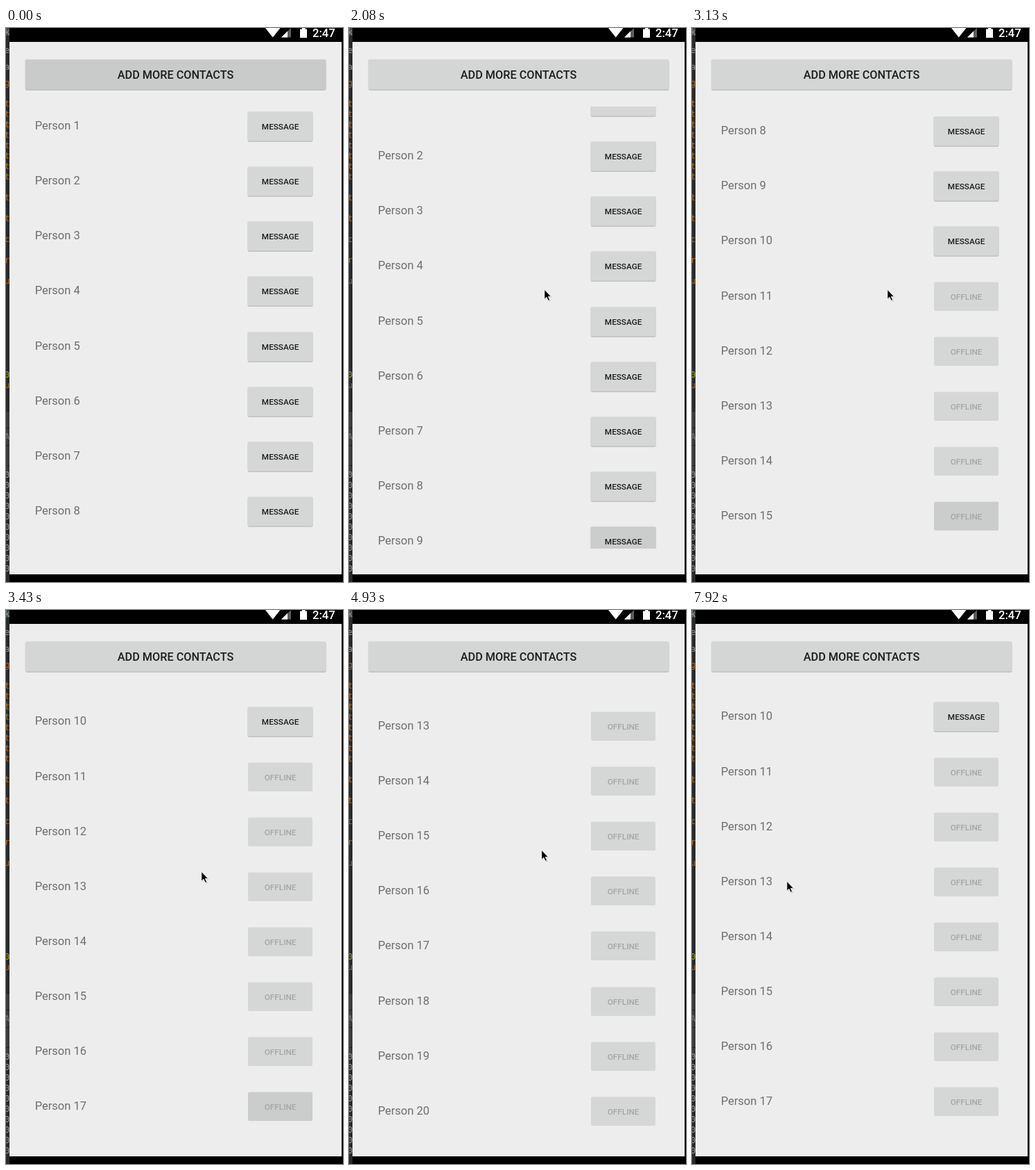
An HTML page that plays this animation: 486x797 px, repeating every 8 s.

```html
<!DOCTYPE html>
<html lang="en">
<head>
<meta charset="utf-8">
<title>Contact list</title>
<style>
  html, body { margin: 0; width: 100%; height: 100%; overflow: hidden; background: #000; }
  svg { display: block; width: 486px; height: 797px; font-family: Roboto, sans-serif; }
  .name { font-size: 16.5px; fill: #6e6e6e; }
  .label { font-size: 11.75px; font-weight: 500; text-anchor: middle; fill: #1c1c1c; }
  .off { fill: #a4a6a5; }
  .face { fill: #d5d7d6; }
  .fresh .face { fill: #cbcdcc; }
  .shadow { fill: #b9bab9; }
  .head { font-size: 16.25px; }
  .code { font: 12px "DejaVu Sans Mono", monospace; }
</style>
</head>
<body>
<svg viewBox="0 0 486 797">
  <defs>
    <clipPath id="list"><rect x="5" y="113" width="479" height="636"/></clipPath>
    <clipPath id="edge"><rect width="5" height="797"/></clipPath>
  </defs>

  <g clip-path="url(#edge)">
    <rect width="5" height="797" fill="#292a2b"/>
    <rect width="5" height="11" fill="#3f4b3e"/>
    <rect y="131" width="5" height="15" fill="#343432"/>
    <rect y="552" width="5" height="90" fill="#3a3c3e"/>
    <path d="M0 551.5H5M0 575.5H5M0 600.5H5M0 629.5H5" stroke="#222"/>
    <g id="code" class="code"></g>
  </g>

  <rect x="5" y="20" width="479" height="766" fill="#ededed"/>
  <g fill="#fff">
    <path d="M374 0H395.500L384.700 13.500Z"/>
    <path d="M397 13.500L411 0V13.500Z" fill="#5c5c5c"/>
    <path d="M397 13.500L406 4.500V13.500Z"/>
    <path d="M424 1.500H427V0H431.500V1.500H434V14H424Z"/>
    <text x="442" y="12.500" font-size="16.600" font-weight="500">2:47</text>
  </g>

  <rect class="shadow" x="28" y="47" width="433.500" height="42.700" rx="2"/>
  <rect id="add" x="27.500" y="45.300" width="434" height="43.200" rx="2"/>
  <text class="label head" x="244.500" y="73">ADD MORE CONTACTS</text>

  <g id="rows" clip-path="url(#list)"></g>

  <g id="cursor">
    <path d="M3 2.500V16L6 13.300L8.400 18.500L11 17.400L8.700 12.500H13Z" fill="#000" opacity=".18"/>
    <path d="M1.800 1.300V15L4.900 12.200L7.200 17.300L9.600 16.200L7.300 11.400H11.600Z"
          fill="#000" stroke="#fff" stroke-width=".9"/>
  </g>
</svg>
<script>
const $ = id => document.getElementById(id);
const LOOP = 8000, PITCH = 79.15, COUNT = 20;

// Strip of editor text showing at the left edge
const glyph = (y, ch, color) => `<text x="-2" y="${y}" fill="${color}">${ch}</text>`;
const every15 = (from, n, ch, color) =>
  Array.from({ length: n }, (_, i) => glyph(from + 15 * i, ch, color)).join('');
const orange = '#b86b20', grey = '#9a9da0';
$('code').innerHTML =
  glyph(10, 'k', grey) + glyph(36, 'e', grey) + glyph(60, 'a', grey) + glyph(83, 'g', orange) +
  every15(113, 8, 't', orange) + glyph(248, 't', orange) + glyph(278, 't', orange) +
  glyph(308, 'c', orange) + glyph(338, 'r', orange) + glyph(368, 'u', orange) +
  glyph(503, '0', '#a5a526') + glyph(518, 'u', orange) + glyph(592, 'A', '#77797b') +
  every15(647, 10, '0', grey);

// Contact rows: the first ten can be messaged
const button = online => online
  ? `<rect class="shadow" x="348.700" y="122" width="93.800" height="41.700" rx="2"/>
     <rect class="face" x="348.300" y="120.200" width="94.500" height="42.200" rx="2"/>
     <text class="label" x="395.600" y="145.800">MESSAGE</text>`
  : `<rect class="face" x="349" y="120.500" width="93" height="41.500" rx="2"/>
     <text class="label off" x="395.600" y="145.800">OFFLINE</text>`;
$('rows').innerHTML = Array.from({ length: COUNT }, (_, i) =>
  `<g><text class="name" x="41.700" y="145.800">Person ${i + 1}</text>${button(i < 10)}</g>`).join('');
const rows = [...$('rows').children];

const DOWN = [36, 112, 188, 264, 339, 409, 478, 547, 620, 693, 766, 839, 912, 921, 924];
const UP = [868, 785, 700];
const pick = (t, start, list) =>
  list[Math.min(list.length - 1, Math.floor((t - start) / 150))];

function scrollAt(t) {
  if (t < 2080) return 0;
  return t < 7620 ? pick(t, 2080, DOWN) : pick(t, 7620, UP);
}

// Stepped pointer moves: start, step length, steps, target x, target y
const MOVES = [
  [890, 145, 3, 280, 375],
  [4930, 145, 5, 240.5, 77],
  [7320, 150, 2, 135, 389]
];

function pointerAt(t) {
  let x = 423, y = 348;
  for (const [start, gap, n, tx, ty] of MOVES) {
    if (t < start) break;
    const k = Math.min(1, (Math.floor((t - start) / gap) + 1) / n);
    const e = k * k * (3 - 2 * k);
    x += (tx - x) * e;
    y += (ty - y) * e;
  }
  return [x, y];
}

function draw(t) {
  const scroll = scrollAt(t), rolling = t >= 2080 && t < 4180;
  rows.forEach((row, i) => {
    const dy = Math.round(PITCH * i - scroll);
    row.setAttribute('transform', `translate(0 ${dy})`);
    row.setAttribute('class', rolling && i > 7 && dy > 510 ? 'fresh' : '');
  });
  $('add').setAttribute('fill', t < 890 ? '#c9cbca' : '#d4d6d5');
  $('cursor').setAttribute('visibility', t < 590 ? 'hidden' : 'visible');
  $('cursor').setAttribute('transform', `translate(${pointerAt(t)})`);
}

const begin = performance.now();
(function frame() {
  draw((performance.now() - begin) % LOOP);
  requestAnimationFrame(frame);
})();
</script>
</body>
</html>
```
